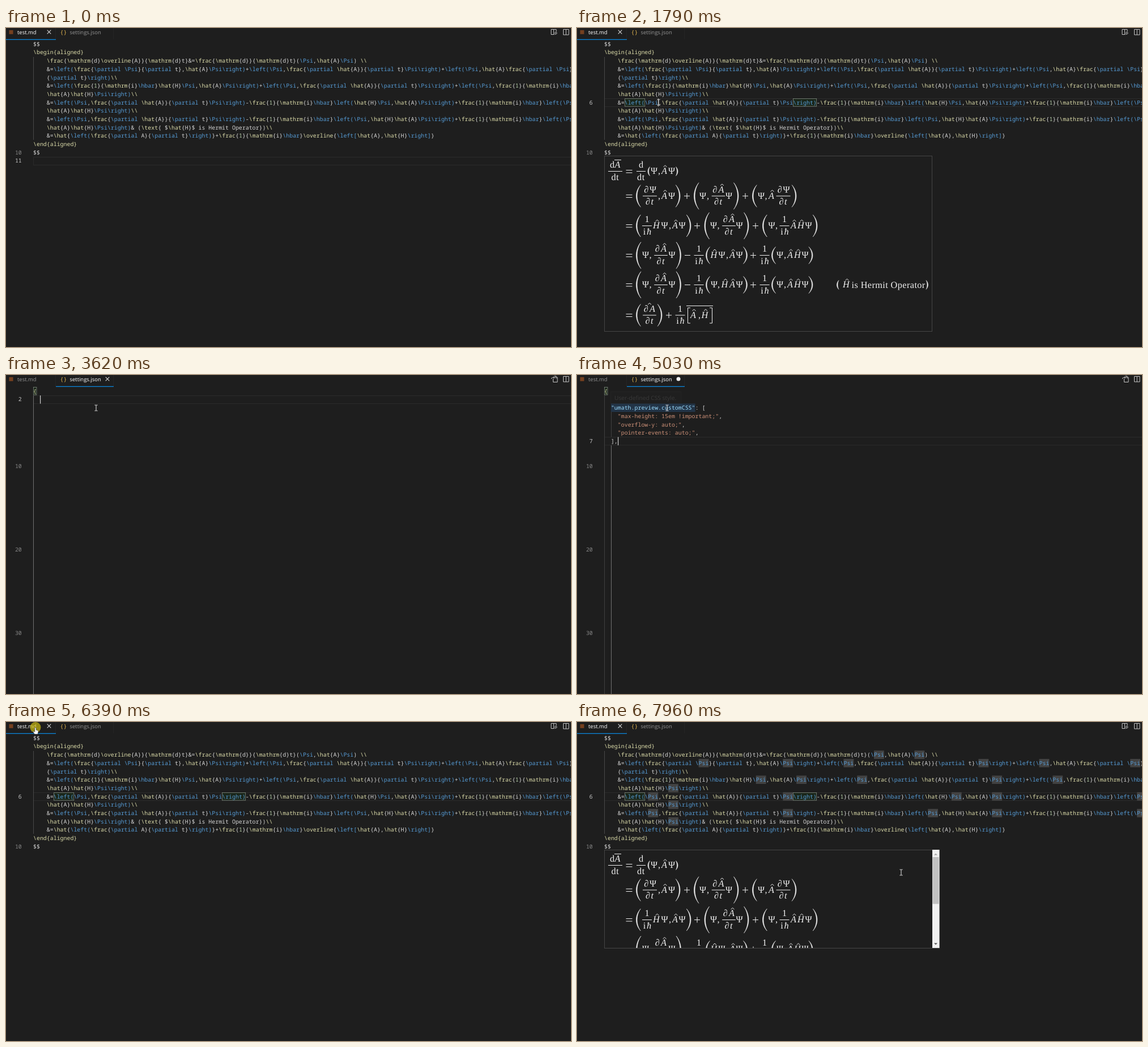
An HTML page that plays this animation: 997 px wide and 562 px high, repeating every 8 s.

```html
<!DOCTYPE html>
<html lang="en">
<head>
<meta charset="utf-8">
<title>Formula preview</title>
<style>
html, body { margin: 0; width: 100%; height: 100%; overflow: hidden; background: #1e1e1e; }
svg { display: block; width: 997px; height: 562px; }
text { white-space: pre; text-rendering: geometricPrecision; }
.code { font: 9.917px "Noto Sans Mono", "DejaVu Sans Mono", monospace; }
.ui { font: 9.45px "Open Sans", "Noto Sans", sans-serif; }
.math { font: 16.3px "Liberation Serif", "Noto Serif", serif; fill: #f0f0f0; text-anchor: middle; }
.it { font-style: italic; }
</style>
</head>
<body>
<svg id="stage" viewBox="0 0 997 562"></svg>
<script>
(() => {
const NS = 'http://www.w3.org/2000/svg';
const stage = document.getElementById('stage');
const LOOP = 8000, CH = 5.95, ROW = 14.68, LEFT = 48;
const FG = '#d4d4d4', KHAKI = '#dcdcaa', BLUE = '#569cd6', DIM = '#858585';

function add(parent, tag, attrs = {}, str) {
  const el = document.createElementNS(NS, tag);
  for (const k in attrs) el.setAttribute(k, attrs[k]);
  if (str !== undefined) el.textContent = str;
  parent.appendChild(el);
  return el;
}
const group = (parent = stage) => add(parent, 'g');
const show = (el, on) => { el.style.display = on ? '' : 'none'; };
const rowY = row => 21 + (row - 1) * ROW;
const colX = col => LEFT + col * CH;
const rect = (p, x, y, width, height, fill, more) => add(p, 'rect', { x, y, width, height, fill, ...more });
const line = (p, d, stroke, w = 1) => add(p, 'path', { d, stroke, 'stroke-width': w, fill: 'none' });
const code = (p, row, col, str, fill) =>
  add(p, 'text', { class: 'code', x: colX(col), y: rowY(row) + 10.8, fill }, str);
const number = (p, row, n, fill = DIM) =>
  add(p, 'text', { class: 'code', x: 27.8, y: rowY(row) + 10.8, fill, 'text-anchor': 'end' }, n);
const current = (p, row) =>
  rect(p, 48.5, Math.round(rowY(row)) + .5, 960, 14, 'none', { stroke: '#2b2b2b' });
const bracket = (p, row, col, len) =>
  rect(p, Math.round(colX(col)) + .5, Math.round(rowY(row)) + .5, len * CH - .5, 13.5,
    'rgba(0,100,0,.12)', { stroke: '#7f8a7f', 'stroke-width': .8 });

// Markdown page
const md = group();
const mdLines = [
  [0, '$$'],
  [0, '\\begin{aligned}'],
  [4, '\\frac{\\mathrm{d}\\overline{A}}{\\mathrm{d}t}&=\\frac{\\mathrm{d}}{\\mathrm{d}t}(\\Psi,\\hat{A}\\Psi) \\\\'],
  [4, '&=\\left(\\frac{\\partial \\Psi}{\\partial t},\\hat{A}\\Psi\\right)+\\left(\\Psi,\\frac{\\partial \\hat{A}}{\\partial t}\\Psi\\right)+\\left(\\Psi,\\hat{A}\\frac{\\partial \\Psi}'],
  [4, '{\\partial t}\\right)\\\\'],
  [4, '&=\\left(\\frac{1}{\\mathrm{i}\\hbar}\\hat{H}\\Psi,\\hat{A}\\Psi\\right)+\\left(\\Psi,\\frac{\\partial \\hat{A}}{\\partial t}\\Psi\\right)+\\left(\\Psi,\\frac{1}{\\mathrm{i}\\hbar}'],
  [4, '\\hat{A}\\hat{H}\\Psi\\right)\\\\'],
  [4, '&=\\left(\\Psi,\\frac{\\partial \\hat{A}}{\\partial t}\\Psi\\right)-\\frac{1}{\\mathrm{i}\\hbar}\\left(\\hat{H}\\Psi,\\hat{A}\\Psi\\right)+\\frac{1}{\\mathrm{i}\\hbar}\\left(\\Psi,'],
  [4, '\\hat{A}\\hat{H}\\Psi\\right)\\\\'],
  [4, '&=\\left(\\Psi,\\frac{\\partial \\hat{A}}{\\partial t}\\Psi\\right)-\\frac{1}{\\mathrm{i}\\hbar}\\left(\\Psi,\\hat{H}\\hat{A}\\Psi\\right)+\\frac{1}{\\mathrm{i}\\hbar}\\left(\\Psi,'],
  [4, '\\hat{A}\\hat{H}\\Psi\\right)& (\\text{ $\\hat{H}$ is Hermit Operator})\\\\'],
  [4, '&=\\hat{\\left(\\frac{\\partial A}{\\partial t}\\right)}+\\frac{1}{\\mathrm{i}\\hbar}\\overline{\\left[\\hat{A},\\hat{H}\\right]}'],
  [0, '\\end{aligned}'],
  [0, '$$']
];
const TOKENS = /(\\(?:Psi|partial|hbar|left[(\[]|right[)\]]))|(\\[a-z]+|\\\\|\{aligned\})|(\d)|(?:[^\\\d{]|\{(?!aligned))+/g;

const lineEnd = group(md), lineSix = group(md), words = group(md);
current(lineEnd, 15);
number(lineEnd, 15, 11, '#c6c6c6');
current(lineSix, 8);
number(lineSix, 8, 6, '#c6c6c6');
bracket(lineSix, 8, 6, 6);
bracket(lineSix, 8, 56, 7);
number(md, 14, 10);
line(md, 'M48.5 51V197', '#484848');
mdLines.forEach(([indent, str], i) => {
  for (const m of str.matchAll(TOKENS)) {
    const col = indent + m.index;
    if (m[0] === '\\Psi') rect(words, colX(col + 1), rowY(i + 1), 3 * CH, ROW, 'rgba(87,87,87,.65)');
    code(md, i + 1, col, m[0], m[1] ? BLUE : m[2] ? KHAKI : m[3] ? '#b5cea8' : FG);
  }
});
const mdCaret = rect(md, 143, 124, 1, 14.5, '#aeafad');

// Formula panel
const panel = group(md);
const frame = rect(panel, 48.5, 225.5, 578, 309, '#1e1e1e', { stroke: '#454545' });
const clip = add(add(stage, 'defs'), 'clipPath', { id: 'view' });
const view = rect(clip, 48, 226, 580, 308);
const math = add(panel, 'g', { 'clip-path': 'url(#view)' });
const INK = '#f0f0f0';
const sym = (x, y, s, it) => add(math, 'text', { class: it ? 'math it' : 'math', x, y }, s);
const stroke = (d, w = 1) => line(math, d, INK, w);
const hat = (x, y) => stroke(`M${x - 3} ${y}l3 -2.7l3 2.7`);

function paren(x, y, h, left) {
  const s = left ? 1 : -1, w = h < 10 ? 3.5 : 4.5 + h * .17;
  const tip = x + s * w, out = x - s * w / 3, inn = out + s * 2.1;
  add(math, 'path', {
    d: `M${tip} ${y - h}C${out} ${y - h * .42} ${out} ${y + h * .42} ${tip} ${y + h}C${inn} ${y + h * .42} ${inn} ${y - h * .42} ${tip} ${y - h}Z`,
    fill: INK, stroke: INK, 'stroke-width': .5
  });
}
function hatted(x, y, s) {
  sym(x, y, s, true);
  hat(x + 1.5, y - 12.2);
}
function fraction(kind, x, y) {
  const up = y - 6.2, down = y + 15;
  const half = { P: 12.5, A: 11.8, a: 11.8, i: 8.5, d: 8 }[kind];
  stroke(`M${x - half} ${y}h${half * 2}`);
  if (kind === 'i') {
    sym(x, up, '1');
    sym(x - 4.5, down, 'i');
    sym(x + 3.5, down, 'ħ', true);
  } else if (kind === 'd') {
    sym(x, up, 'd');
    sym(x - 3, down, 'd');
    sym(x + 4, down, 't');
  } else {
    sym(x - 6.3, up, '∂', true);
    if (kind === 'P') sym(x + 5.5, up, 'Ψ');
    if (kind === 'A') hatted(x + 5, up, 'A');
    if (kind === 'a') { sym(x + 5, up, 'A', true); hat(x, up - 12.5); }
    sym(x - 3.5, down, '∂', true);
    sym(x + 4.2, down, 't', true);
  }
}
const SIZE = { '': 8, m: 15, l: 19.5, x: 23.5 };
function formula(y, spec) {
  for (const item of spec.split(' ')) {
    const [, key, mod, num] = item.match(/^(.)([a-zA-Z]?)([\d.]+)$/);
    const x = +num, base = y + 4.5;
    if (key === '/') fraction(mod, x, y);
    else if (key === '(' || key === ')') paren(x, y, SIZE[mod], key === '(');
    else if (key === '[' || key === ']') {
      const w = key === '[' ? 4.5 : -4.5;
      stroke(`M${x + w} ${y - 13}h${-w}v27h${w}`);
    }
    else if (key === '=') stroke(`M${x - 5.5} ${y - 2}h11m-11 4.5h11`);
    else if (key === '-') stroke(`M${x - 5} ${y}h10`);
    else if (key === '+') stroke(`M${x - 5} ${y}h10m-5 -5v10`);
    else if (key === 'A' || key === 'H') hatted(x, base, key);
    else sym(x, base, key);
  }
}
// Numerator with an overline
sym(62, 246.3, 'd');
sym(71.5, 246.3, 'A', true);
sym(64.5, 267.5, 'd');
sym(71.5, 267.5, 't');
stroke('M66 232.5h12M55 252.5h25');
formula(252.5, '=92 /d113 (125 Ψ136 ,145 A154 Ψ167 )178');
formula(296, '=92 (l104.5 /P128.5 ,145 A154 Ψ167 )l182 +194 (x206.5 Ψ222 ,231 /A249.5 Ψ268 )x285 +297 (l309.5 Ψ325 ,333.5 A343 /P364 )l387');
formula(348.5, '=92 (l104.5 /i123.5 H140 Ψ154.5 ,164 A173 Ψ185.5 )l201 +212 (x225 Ψ241 ,249.5 /A268 Ψ286.5 )x303 +315 (l327.5 Ψ343.5 ,352 /i366 A382 H395 Ψ408.5 )l424');
const head = '=92 (x104.5 Ψ121 ,129.5 /A148 Ψ167.5 )x183.5 -195 /i215 (m227.5 ';
const tail = 'A274 Ψ286.5 )m300.5 +311 /i331 (m343.5 Ψ358 ,367 A376 H389 Ψ402.5 )m416';
formula(400.5, head + 'H241.5 Ψ255.5 ,265 ' + tail);
formula(452.5, head + 'Ψ242 ,250 H260.5 ' + tail + ' (458.5 H475 )619.5');
add(math, 'text', { class: 'math', x: 484.5, y: 457.5, style: 'text-anchor:start;letter-spacing:.4px' }, 'is Hermit Operator');
formula(506, '=92 (l104.5 /a128 )l150 +162 /i182 [195.5 A205 ,216 H225.5 ]238.5');
stroke('M193 489.5h47');

const bar = group(panel);
rect(bar, 627, 225, 12.5, 173, '#f1f1f1');
rect(bar, 627.5, 238, 11, 82.5, '#c1c1c1');
add(bar, 'path', { d: 'M630 234.5l3 -3l3 3z', fill: '#a3a3a3' });
add(bar, 'path', { d: 'M630 389.5l3 3l3 -3z', fill: '#505050' });

// Settings page
const json = group();
const before = group(json), after = group(json);
[10, 20, 30].forEach(n => number(json, n, n));
current(before, 2);
number(before, 2, 2, '#c6c6c6');
line(before, 'M48.5 36V562', '#707070');
current(after, 7);
number(after, 7, 7, '#c6c6c6');
line(after, 'M48.5 36V562M60.5 65V109', '#404040');
line(after, 'M60.5 124V562', '#707070');
const outer = group(json);
bracket(outer, 1, 0, 1);
code(json, 1, 0, '{', KHAKI);
const mark = rect(after, colX(2), rowY(3), 25 * CH, ROW, 'rgba(38,79,120,.45)');
code(after, 3, 2, '"umath.preview.customCSS"', '#9cdcfe');
code(after, 3, 27, ': [', FG);
['max-height: 15em !important;', 'overflow-y: auto;', 'pointer-events: auto;'].forEach((s, i) => {
  code(after, i + 4, 4, `"${s}"`, '#ce9178');
  code(after, i + 4, 6 + s.length, ',', FG);
});
code(after, 7, 2, '],', FG);
const tip = group(after);
rect(tip, 59.5, 29.5, 124, 21, '#252526', { stroke: '#454545' });
add(tip, 'text', { class: 'ui', x: 66, y: 44.3, fill: '#cccccc', style: 'font-size:10.2px' }, 'User-defined CSS style.');
const jsonCaret = rect(json, 60, 36, 1.2, 14.5, '#d0d0d0');

// Tab strip
const tabs = group();
line(tabs, 'M87.5 0V20M189.5 0V20', '#252526');
rect(tabs, 5.5, 3.8, 7, 7, '#75401f');
add(tabs, 'text', { class: 'code', x: 95.5, y: 10.7, fill: '#d9ae4c' }, '{}');
const mdName = add(tabs, 'text', { class: 'ui', x: 20, y: 11 }, 'test.md');
const jsonName = add(tabs, 'text', { class: 'ui', x: 112.5, y: 11 }, 'settings.json');
const cross = x => line(tabs, `M${x - 3.3} 3.7l6.6 6.6m0 -6.6l-6.6 6.6`, '#d8d8d8', 1.1);
const mdCross = cross(76), jsonCross = cross(179);
const dot = add(tabs, 'circle', { cx: 179, cy: 7, r: 3.5, fill: '#f0f0f0' });
const mdLine = rect(tabs, 0, 19.7, 88, 1.3, '#0a84d8');
const jsonLine = rect(tabs, 88, 19.7, 102, 1.3, '#0a84d8');
const ICON = '#c5c5c5';
line(tabs, 'M983.5 2.5h9.5v9.5h-9.5zM988.2 2.5v9.5', ICON);
const mdIcon = group(tabs), jsonIcon = group(tabs);
line(mdIcon, 'M967 11.5h-5v-9h9v4M966.5 2.5v9', ICON);
line(mdIcon, 'M968 12l1.5 -1.6M972 9a1.7 1.7 0 1 0 -3.4 0a1.7 1.7 0 1 0 3.4 0', ICON);
line(jsonIcon, 'M965.5 7v5.5h7.5v-8l-2.5 -2.5h-3M970 2v3h3M968 4.5h-3.5q-2 0 -2 2.5M966 2.5l2 2l-2 2', ICON);

// Pointer
const mouse = group();
const ring = add(mouse, 'circle', { cx: 0, cy: -.5, r: 9.5, fill: '#d2c010', opacity: .68 });
const hand = add(mouse, 'path', {
  d: 'M-1.2 .4Q0 -1 1.2 .4V4L4 4.8Q5 5.3 5 7L4 11.5H-1.6L-4 7.6Q-4 5.8 -2.5 6.5L-1.2 7.4Z',
  fill: '#fff', stroke: '#222', 'stroke-width': .6
});
const beam = line(mouse, 'M-2.5 -5H-.7L0 -4.4L.7 -5H2.5M0 -4.4V4.4M-2.5 5H-.7L0 4.4L.7 5H2.5', '#e8e8e8');

// start, steps, destination, easing power (smooth without one)
const moves = [
  { at: 260, n: 12, to: [178, 150] },
  { at: 1090, n: 5, to: [144, 131] },
  { at: 1920, n: 8, to: [123, 12] },
  { at: 2740, n: 8, to: [159, 58] },
  { at: 5370, n: 10, to: [52, 10] },
  { at: 6660, n: 12, to: [564, 267], pow: 2.85 },
  { at: 7500, n: 1, to: [572, 265] }
];
function pointer(t) {
  let p = [905, 552];
  for (const { at, n, to, pow } of moves) {
    if (t < at) break;
    const u = Math.min(1, (Math.floor((t - at) / 69) + 1) / n);
    const e = pow ? u ** pow : u * u * (3 - 2 * u);
    p = p.map((v, i) => v + (to[i] - v) * e);
  }
  return p;
}
const within = (t, ...spans) => spans.some(([a, b]) => t >= a && t < b);

function draw(t) {
  const settings = within(t, [2600, 6390]);
  const clicked = t >= 1440, pasted = t >= 3950, scrolls = t >= 6390;
  const [x, y] = pointer(t);
  const overTab = y < 21 && x < 190;
  const overMd = overTab && x < 88, overJson = overTab && x >= 88;

  show(md, !settings);
  show(json, settings);
  show(lineEnd, !clicked);
  show(lineSix, clicked);
  show(words, within(t, [1850, 2600], [6660, LOOP]));
  show(mdCaret, within(t, [1440, 1930], [2400, 2600], [6460, 6940], [7430, 7960]));
  show(panel, within(t, [1650, 2600], [6460, LOOP]));
  show(bar, scrolls);
  frame.setAttribute('width', scrolls ? 591 : 578);
  frame.setAttribute('height', scrolls ? 173 : 309);
  view.setAttribute('height', scrolls ? 172 : 308);

  show(before, !pasted);
  show(after, pasted);
  show(outer, t >= 2740);
  show(mark, within(t, [4960, 5170]));
  show(tip, within(t, [5030, 5170]));
  tip.setAttribute('opacity', t < 5100 ? .15 : .5);
  show(jsonCaret, within(t, [2670, 3150], [3620, 4430], [4890, 5370], [5860, 6390]));
  jsonCaret.setAttribute('x', pasted ? 72 : 60);
  jsonCaret.setAttribute('y', pasted ? 109.3 : 36);

  const unsaved = within(t, [3950, 5170]);
  mdName.setAttribute('fill', settings ? '#949494' : '#ffffff');
  jsonName.setAttribute('fill', settings ? '#ffffff' : '#949494');
  show(mdCross, !settings || overMd);
  show(jsonCross, (settings || overJson) && !unsaved);
  show(dot, unsaved);
  show(mdLine, !settings || overMd);
  show(jsonLine, settings || overJson);
  show(mdIcon, !settings);
  show(jsonIcon, settings);

  show(mouse, t >= 260);
  mouse.setAttribute('transform', `translate(${x.toFixed(1)} ${y.toFixed(1)})`);
  show(hand, overTab);
  show(beam, !overTab);
  show(ring, within(t, [1440, 1580], [2600, 2670], [6390, 6460]));
}

const start = performance.now();
function tick() {
  draw((performance.now() - start) % LOOP);
  requestAnimationFrame(tick);
}
tick();
})();
</script>
</body>
</html>
```
